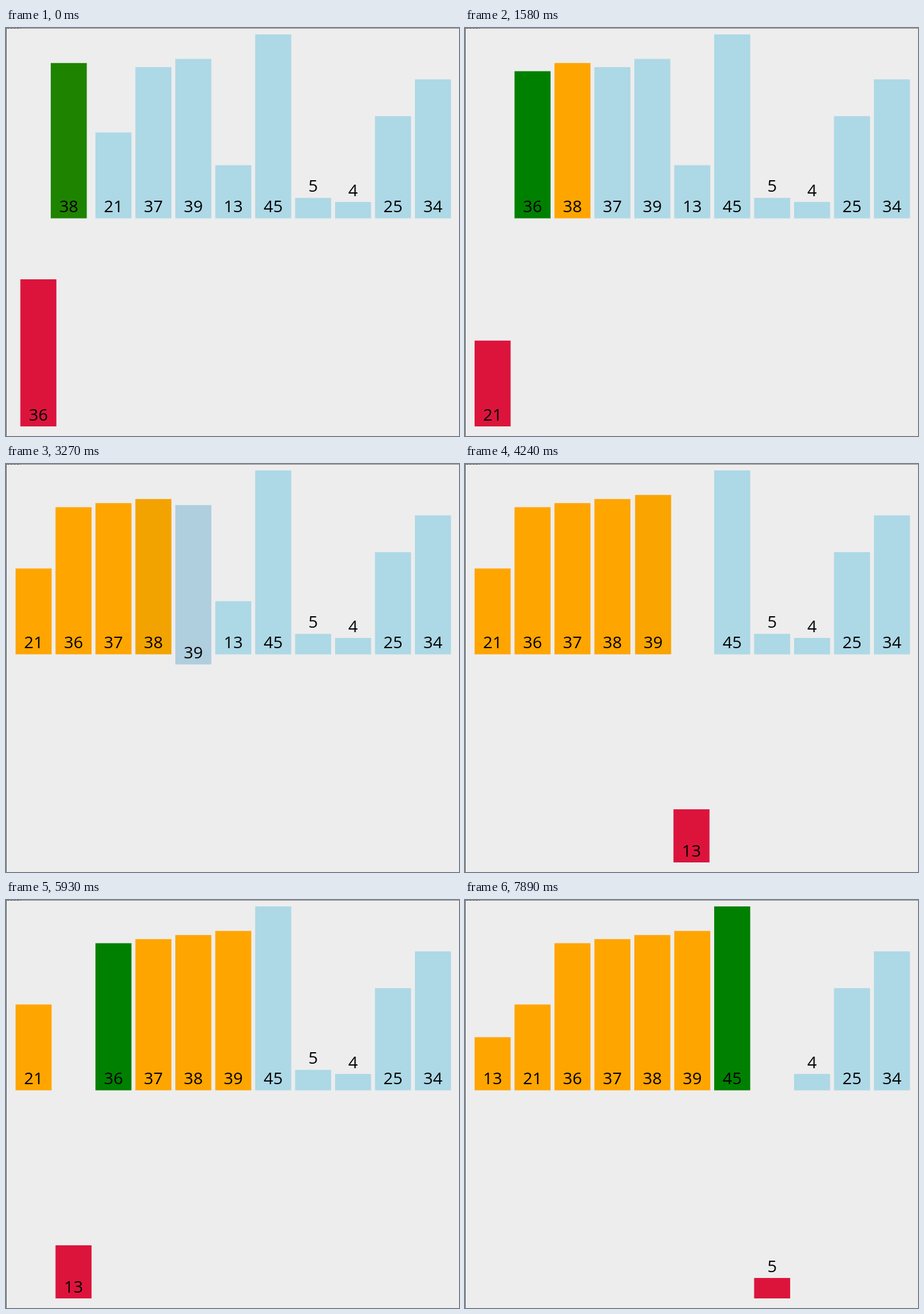
These frames come from a looping animation (709x638 px, 8 s). An HTML page:

```html
<!DOCTYPE html>
<html lang="en">
<head>
<meta charset="utf-8">
<title>Insertion sort</title>
<style>
  html, body { margin: 0; width: 100%; height: 100%; overflow: hidden; background: #ededed; }
  svg { display: block; }
  text { font: 26px "Open Sans", "Noto Sans", sans-serif; text-anchor: middle; fill: #000; }
</style>
</head>
<body>
<svg id="stage" width="709" height="638" viewBox="0 0 709 638">
  <g id="bars"></g>
  <path d="M0 .5H709" stroke="#8c8c8c"/>
  <path d="M.5 0V638" stroke="#646464"/>
  <path d="M2 .5H23" stroke="#505050" stroke-dasharray="3 2"/>
</svg>
<script>
const LOOP = 8000, TICK = 120;
const LEFT = 15, PITCH = 62.5, WIDTH = 56.4, UNIT = 6.39;
const BASE = 297.6, DROP = 325.4, PAD = 9.5;

const BLUE = [173, 216, 230], ORANGE = [255, 165, 0];
const GREEN = [0, 128, 0], RED = [220, 20, 60];

const values = [38, 36, 21, 37, 39, 13, 45, 5, 4, 25, 34];

// Each action is a list of [value, changed properties].
const tint = (v, color) => [[v, { color }]];
const rest = v => tint(v, ORANGE);
const down = v => [[v, { low: 1, color: RED }]];
const up = v => [[v, { low: 0, color: ORANGE }]];
const shift = (v, key, slot) => [[v, { slot, color: GREEN }], [key, { slot: slot - 1 }]];

const step = (at, phase, ...actions) => ({ at, phase, changes: actions.flat() });

const steps = [
  step(-120, .21, shift(38, 36, 1)),
  step(370, .23, up(36), rest(38), down(21)),
  step(850, .23, shift(38, 21, 2)),
  step(1340, .23, shift(36, 21, 1), rest(38)),
  step(1820, .23, up(21), rest(36), down(37)),
  step(2300, .23, shift(38, 37, 3)),
  step(2780, .23, up(37), rest(38)),
  step(3270, .23, tint(38, GREEN), down(39)),
  step(3760, .23, up(39), rest(38), down(13)),
  step(4240, .17, shift(39, 13, 5)),
  step(4720, .23, shift(38, 13, 4), rest(39)),
  step(5210, .23, shift(37, 13, 3), rest(38)),
  step(5690, .23, shift(36, 13, 2), rest(37)),
  step(6180, .23, shift(21, 13, 1), rest(36)),
  step(6670, .27, up(13), rest(21), down(45)),
  step(7160, .23, up(45)),
  step(7650, .23, tint(45, GREEN), down(5))
];

const ease = t => t >= 1 ? 1 : t < .5 ? 4 * t ** 3 : 1 - 4 * (1 - t) ** 3;
const mix = (a, b, e) => Array.isArray(a) ? a.map((n, i) => mix(n, b[i], e)) : a + (b - a) * e;

function add(parent, name, attrs) {
  const el = document.createElementNS("http://www.w3.org/2000/svg", name);
  for (const key in attrs) el.setAttribute(key, attrs[key]);
  return parent.appendChild(el);
}

const nodes = new Map(values.map(v => {
  const group = add(document.getElementById("bars"), "g", {});
  const height = v * UNIT;
  const rect = add(group, "rect", { y: -height, width: WIDTH, height });
  const y = height < 40 ? -height - PAD : -PAD;
  add(group, "text", { x: WIDTH / 2, y }).textContent = v;
  return [v, { group, rect }];
}));

function stateAt(time) {
  const state = new Map(values.map((v, slot) => [v, { slot, low: 0, color: BLUE }]));
  Object.assign(state.get(38), { color: ORANGE });
  Object.assign(state.get(36), { low: 1, color: RED });
  for (const { at, phase, changes } of steps) {
    if (time < at) break;
    const tick = Math.floor((time - at) / TICK);
    const e = ease(phase + tick * .48);
    for (const [v, props] of changes) {
      const bar = state.get(v);
      for (const key in props) bar[key] = mix(bar[key], props[key], e);
    }
  }
  return state;
}

function draw(time) {
  for (const [v, { slot, low, color }] of stateAt(time)) {
    const { group, rect } = nodes.get(v);
    group.setAttribute("transform", `translate(${LEFT + slot * PITCH} ${BASE + low * DROP})`);
    rect.setAttribute("fill", `rgb(${color.map(Math.round)})`);
  }
}

const start = performance.now();
function frame() {
  draw((performance.now() - start) % LOOP);
  requestAnimationFrame(frame);
}
draw(0);
requestAnimationFrame(frame);
</script>
</body>
</html>
```
